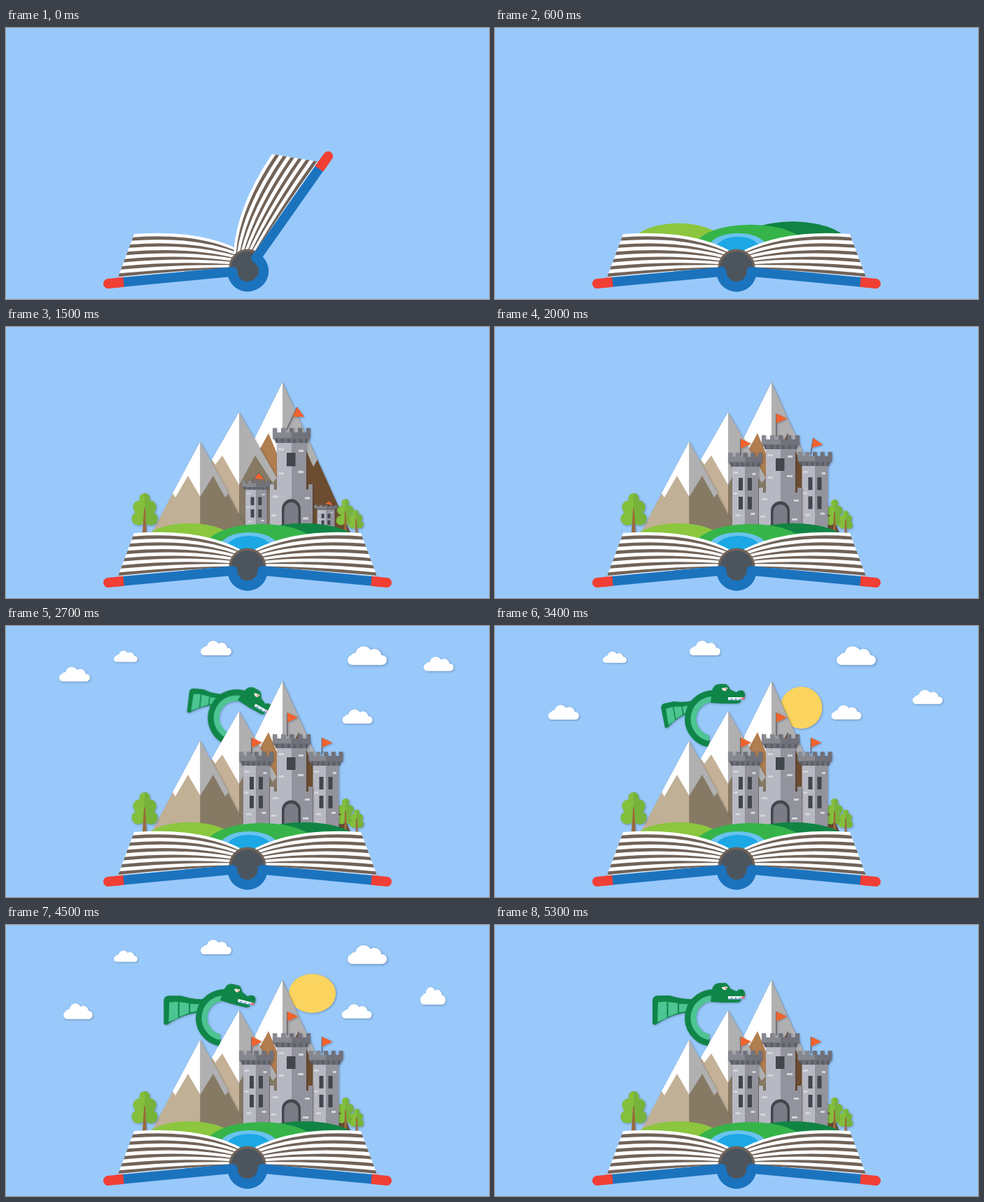
Animation of 690x388 px, one loop 5400 ms. Source, as an HTML page:

```html
<!DOCTYPE html>
<html lang="en">
<head>
<meta charset="utf-8">
<title>Pop-up story book</title>
<style>
  html, body { margin: 0; width: 100%; height: 100%; overflow: hidden; background: #99c9fb; }
  svg { display: block; width: 690px; height: 388px; }
  .lift { filter: drop-shadow(1.5px 1.5px 1.5px rgba(30, 45, 70, .36)); }
</style>
</head>
<body>
<svg id="stage" viewBox="0 0 690 388" xmlns="http://www.w3.org/2000/svg"></svg>
<script>
const LOOP = 5400, STEP = 100;
const stage = document.getElementById('stage');

// ---------- drawing helpers ----------
const poly = (points, fill) => `<polygon points="${points}" fill="${fill}"/>`;
const rect = (x, y, w, h, fill, r = 0) =>
  `<rect x="${x}" y="${y}" width="${w}" height="${h}" rx="${r}" fill="${fill}"/>`;
const disc = (x, y, rx, fill, ry = rx) =>
  `<ellipse cx="${x}" cy="${y}" rx="${rx}" ry="${ry}" fill="${fill}"/>`;
const path = (d, fill) => `<path d="${d}" fill="${fill}"/>`;
const line = (d, color, width, cap = 'butt') =>
  `<path d="${d}" fill="none" stroke="${color}" stroke-width="${width}" stroke-linecap="${cap}"/>`;
const group = (id, body, cls = '') => `<g id="${id}" class="${cls}">${body}</g>`;
const mix = (a, b, k) => a + (b - a) * k;

// ---------- book ----------
// k runs from the top page (0) to the cover (1)
const outer = k => [mix(183, 160, k), mix(295, 357, k)];
const bend = k => [mix(275, 240, k), mix(288, 349, k)];
const inner = k => [mix(334, 319, k), mix(318, 344, k)];

function sheet(k1, k2, fill, in1 = k1, in2 = k2) {
  return path(`M${outer(k1)} Q${bend(k1)} ${inner(in1)} L${inner(in2)} Q${bend(k2)} ${outer(k2)}Z`, fill);
}

function pages() {
  let s = sheet(0, 1, '#fff');
  for (let i = 0; i < 6; i++)
    s += sheet((i + .45) / 6, (i + .92) / 6, '#716359', (i + .66) / 6, (i + .92) / 6);
  return s;
}

const cover = line('M166 364 L323.500 349', '#1b73be', 13.5, 'round') +
  line('M146 366 L160 364.600', '#f13f35', 14, 'round') +
  line('M158 364.800 L168 363.800', '#f13f35', 14) +
  line('M323.500 349 A21.500 21.500 0 0 0 363.600 359.750', '#1b73be', 14, 'round');

const spine = disc(345, 343, 26.5, '#716359') + disc(345, 343.5, 23.5, '#4c555d') + disc(345, 349, 15, '#4c555d');

// ---------- landscape ----------
function mountain(x, top, left, right, base, snow, light, dark) {
  const h = base - top;
  const [l, r] = snow;
  return poly(`${x},${top} ${x - left * h},${base} ${x},${base}`, light) +
    poly(`${x},${top} ${x + right * h},${base} ${x},${base}`, dark) +
    poly(`${x},${top} ${l}`, '#fff') + poly(`${x},${top} ${r}`, '#b0b0b1');
}

function tree(x, base, w, h) {
  const lobes = [[0, -.84, .2], [-.19, -.63, .26], [.19, -.63, .26], [-.24, -.35, .26], [.24, -.35, .26], [0, -.4, .3]];
  const crown = (fill, clip) => lobes.filter(l => !clip || l[0] >= 0)
    .map(([dx, dy, r]) => disc(x + dx * w, base + dy * h, r * w, fill)).join('');
  const id = 'half' + x;
  return `<clipPath id="${id}">${rect(x, base - h - 5, w, h + 5, '#000')}</clipPath>` +
    crown('#84bf3d') + `<g clip-path="url(#${id})">${crown('#77b33b', true)}</g>` +
    poly(`${x - .8},${base - h * .6} ${x + .8},${base - h * .6} ${x + w * .08},${base} ${x - w * .08},${base}`, '#9a6a3c');
}

// ---------- castle ----------
const STONE = '#b7b8c2', SHADE = '#93939d', DARK = '#42464e', CHIP = '#d3d4db';
const RIM = '#86878f', RIM_SHADE = '#70717a';

function tower(x, w, top, base) {
  const half = w / 2, cap = half + 6;
  let s = rect(x - half, top + 10, half, base - top - 10, STONE) +
    rect(x, top + 10, half, base - top - 10, SHADE);
  for (let i = 0; i < 5; i++) s += rect(x - cap + i * (2 * cap - 6) / 4, top, 6, 8, i < 2 ? RIM : RIM_SHADE);
  s += rect(x - cap, top + 6, cap, 7, RIM) + rect(x, top + 6, cap, 7, RIM_SHADE);
  s += poly(`${x - cap},${top + 13} ${x + cap},${top + 13} ${x + half},${top + 20} ${x - half},${top + 20}`, '#6d6e77');
  for (let i = 0; i < 6; i++) s += rect(x - cap + 4 + i * (2 * cap - 11) / 5, top + 14, 3, 6, '#5a5c65', 1.5);
  return s;
}

const flag = (id, x, y, base) => group(id,
  line(`M${x} ${y} V${base}`, '#5d5e66', 1.4) + poly(`${x},${y} ${x + 15},${y + 7} ${x},${y + 14}`, '#f2622c'));

const chips = list => list.map(([x, y, w = 7]) => rect(x, y, w, 3, CHIP)).join('');

function sideTower(x) {
  let s = tower(x, 37, 180, 295);
  for (const dx of [-9.5, 3.5]) for (const y of [216, 243]) s += rect(x + dx, y, 6, 18, DARK);
  return s + chips([[x - 17, 207], [x + 10, 209, 5], [x - 17, 237, 6], [x - 14, 268], [x + 8, 266, 6]]);
}

function keep() {
  let s = tower(408, 42, 155, 295) + rect(401, 188, 12.5, 18, DARK);
  s += rect(377, 237, 31, 58, STONE) + rect(408, 237, 30, 58, SHADE);
  for (const x of [377, 387, 422, 432]) s += rect(x, 230, 6, 8, x < 408 ? STONE : SHADE);
  s += path('M394 295 V263 A13.500 13.500 0 0 1 421 263 V295Z', DARK) +
    path('M397.500 295 V264 A10 10 0 0 1 417.500 264 V295Z', '#7b7c86');
  return s + chips([[389, 182, 8], [418, 184], [390, 214], [417, 212, 8], [381, 245, 8], [379, 270], [427, 247], [424, 274, 8]]);
}

// ---------- dragon ----------
const GREEN = '#108548', MINT = '#4cc592';
const neck = line('M318 97.500 A36 36 0 1 0 306 168.500', GREEN, 10) +
  line('M317 105.500 A28 28 0 1 0 306 160.500', MINT, 8);
const wing = path('M225 109 Q225 101 233 101 L250 101 Q268 107 284 106 L279 125 Q254 126 229 143 L225 142Z', GREEN) +
  path('M233 110.500 L245.500 109.500 L245.500 133 L232 139Z', MINT) +
  path('M247.500 110 L261 112 L261 126 L247.500 131.500Z', MINT) +
  path('M263 113 L280 113.500 L277 123 L263 125Z', MINT);
const head = path('M308 110 L310 93 Q312 83 321 83 L330 83 Q334 86 336 91 L345 95 Q348 91 354 92.500 Q358 95 357 102 L333 102 L333 106.500 L352 106.500 Q351 110.500 345 111 L326 111Z', GREEN) +
  poly('333,102 354,102 352,105 350,103 347,106 344,103 341,106 338,103 335,106 333,105', '#fff') +
  poly('352,103 357,101.500 356,105 352,105.500', '#ee6a6d') +
  path('M324 89 L332 88 Q332 93 328 93 Q324 92 324 89Z', '#fdeee4') +
  disc(330, 90.5, 1, '#c94a3d') + disc(353, 96, 1.1, '#0a5c33');

// ---------- clouds: centre x, centre y, width, entry, exit ----------
const CLOUDS = [
  [171, 45, 34, 2500, 4550],
  [300, 32, 44, 2200, 4600],
  [516, 43, 56, 2100, 4600],
  [618, 102, 43, 2600, 4250],
  [502, 124, 43, 2300, 4470],
  [98, 124, 44, 2600, 4400]
];
const puff = rect(-22, -1, 44, 11, '#fff', 5.5) + disc(-4, -2, 9, '#fff') +
  disc(8, 0, 8, '#fff') + disc(-13, 3, 6.5, '#fff');

stage.innerHTML =
  rect(0, 0, 690, 388, '#99c9fb') +
  group('sun', disc(0, 0, 30, '#fbd45f'), 'lift') +
  group('dragon', group('wing', wing) + neck + group('head', head), 'lift') +
  CLOUDS.map((c, i) => group('cloud' + i, puff, 'lift')).join('') +
  group('peakC', mountain(395, 79, .49, .45, 295, ['348,174 356,187 375,152 395,200', '395,200 418,152 439,200 445,190'], '#b17e50', '#6c4d30'), 'lift') +
  group('peakB', mountain(333, 122, .57, .57, 295, ['294,190 299,197 309,184 333,226', '333,226 356,184 381,223 387,216'], '#c4b197', '#867a65'), 'lift') +
  group('peakA', mountain(277.5, 164, .53, .53, 295, ['238,238 242,244 260,213 277.5,243', '277.5,243 296,213 313,244 318,238'], '#c0b096', '#867a65'), 'lift') +
  group('treeL', tree(198, 295, 37, 59), 'lift') +
  group('treeA', tree(485, 295, 26, 51), 'lift') +
  group('treeB', tree(501, 295, 20, 33), 'lift') +
  group('towerL', flag('flagL', 351, 160, 184) + sideTower(357.5), 'lift') +
  group('towerR', flag('flagR', 451.5, 160, 184) + sideTower(457), 'lift') +
  group('keep', flag('flagK', 402, 124, 158) + keep(), 'lift') +
  group('hillL', disc(262, 311, 67, '#8bc63e', 30)) +
  group('hillR', disc(425, 311, 80, '#118444', 30)) +
  group('hillM', disc(365, 315, 80, '#36b44a', 33) + disc(347, 317, 43, '#69c3ef', 23) + disc(347, 319, 33, '#1ca7e5', 20)) +
  pages() + group('rightPages', pages()) + spine + cover + group('rightCover', cover);

// ---------- motion ----------
const part = {};
stage.querySelectorAll('g[id]').forEach(g => part[g.id] = g);
const unit = (t, start, length) => Math.min(1, Math.max(0, (t - start) / length));
const backIn = (u, k) => u * u * ((k + 1) * u - k);
const backOut = (u, k) => 1 - backIn(1 - u, k);
const put = (id, transform) => part[id].setAttribute('transform', transform);
const show = (id, on) => part[id].setAttribute('display', on ? 'inline' : 'none');

function grow(id, x, y, sx, sy, angle = 0) {
  show(id, sy > .001);
  put(id, `translate(${x} ${y}) rotate(${angle}) scale(${sx} ${sy}) translate(${-x} ${-y})`);
}

// id, x, base y, start, length, overshoot
const RISERS = [
  ['hillL', 262, 311, 300, 520, 1.2],
  ['hillR', 425, 311, 310, 500, 2],
  ['hillM', 365, 315, 250, 400, 1.2],
  ['peakA', 277, 295, 620, 580, 0],
  ['peakB', 333, 295, 640, 500, 0],
  ['peakC', 395, 295, 660, 460, 0],
  ['keep', 408, 295, 1300, 600, 2.5],
  ['towerL', 357, 295, 1400, 600, 2],
  ['towerR', 457, 295, 1450, 600, 1.7]
];
// id, x, start, lean
const TREES = [['treeL', 198, 750, 25], ['treeA', 485, 900, -25], ['treeB', 501, 1050, -25]];
// id, x, base y, start, length
const FLAGS = [['flagK', 402, 155, 1300, 600], ['flagL', 351, 180, 1400, 600], ['flagR', 451.5, 180, 1500, 660]];

function drawSun(t) {
  show('sun', t > 2900 && t < 4850);
  const out = backIn(unit(t, 4200, 600), 2.6);
  const rise = 1 - backOut(unit(t, 2900, 500), 2.6);
  const squash = Math.min(0, out);
  put('sun', `translate(437.5 ${117 + 95 * (out + rise)}) scale(${1 - .6 * squash} ${1 + .35 * squash})`);
}

function drawClouds(t) {
  CLOUDS.forEach(([x, y, w, enter, leave], i) => {
    const out = backIn(unit(t, leave, 600), 1.7);
    const drop = 1 - backOut(unit(t, enter, 500), 1.4);
    const way = x < 345 ? -(x + w) : 690 - x + w;
    const sx = 1 + out * (out < 0 ? 1.6 : .3);
    const sy = 1 - out * (out < 0 ? 2.2 : .2);
    const size = w / 44;
    show('cloud' + i, t > enter);
    put('cloud' + i, `translate(${x + way * Math.max(out, -.07)} ${y - drop * (y + 40)}) scale(${size * sx} ${size * sy})`);
  });
}

function drawDragon(t) {
  const u = unit(t, 2450, 600), s = backOut(u, 1.4);
  grow('dragon', 325, 190, s, s, 50 * (1 - u) ** 2);
  const fold = .5 + .5 * Math.cos((t - 3400) / 760 * 2 * Math.PI);
  const m = [mix(1, .777, fold), -.167 * fold, .163 * fold, mix(1, .817, fold)];
  put('wing', `translate(282 110) matrix(${m} 0 0) translate(-282 -110)`);
  const nod = 7.5 * (1 - Math.cos((t - 3400) / 1900 * 2 * Math.PI));
  put('head', `rotate(${nod} 316 100)`);
}

function draw(t) {
  const open = unit(t, 0, 400);
  const hinge = `rotate(${-60.3 * (1 - open * open * (3 - 2 * open))} 345 347) translate(690 0) scale(-1 1)`;
  put('rightPages', hinge);
  put('rightCover', hinge);
  for (const [id, x, y, start, length, k] of RISERS) {
    const u = unit(t, start, length);
    const s = k ? backOut(u, k) : 1 - (1 - u) ** 3;
    grow(id, x, y, Math.min(1, .5 + s / 2), s);
  }
  for (const [id, x, start, lean] of TREES) {
    const u = unit(t, start, 700), s = backOut(u, 1);
    grow(id, x, 295, s, s, lean * (1 - u) ** 2);
  }
  for (const [id, x, y, start, length] of FLAGS)
    put(id, `rotate(${40 * (1 - unit(t, start, length))} ${x} ${y})`);
  drawSun(t);
  drawClouds(t);
  drawDragon(t);
}

const begin = performance.now();
function tick() {
  const t = (performance.now() - begin) % LOOP;
  draw(Math.floor(t / STEP) * STEP);
  requestAnimationFrame(tick);
}
tick();
</script>
</body>
</html>
```
